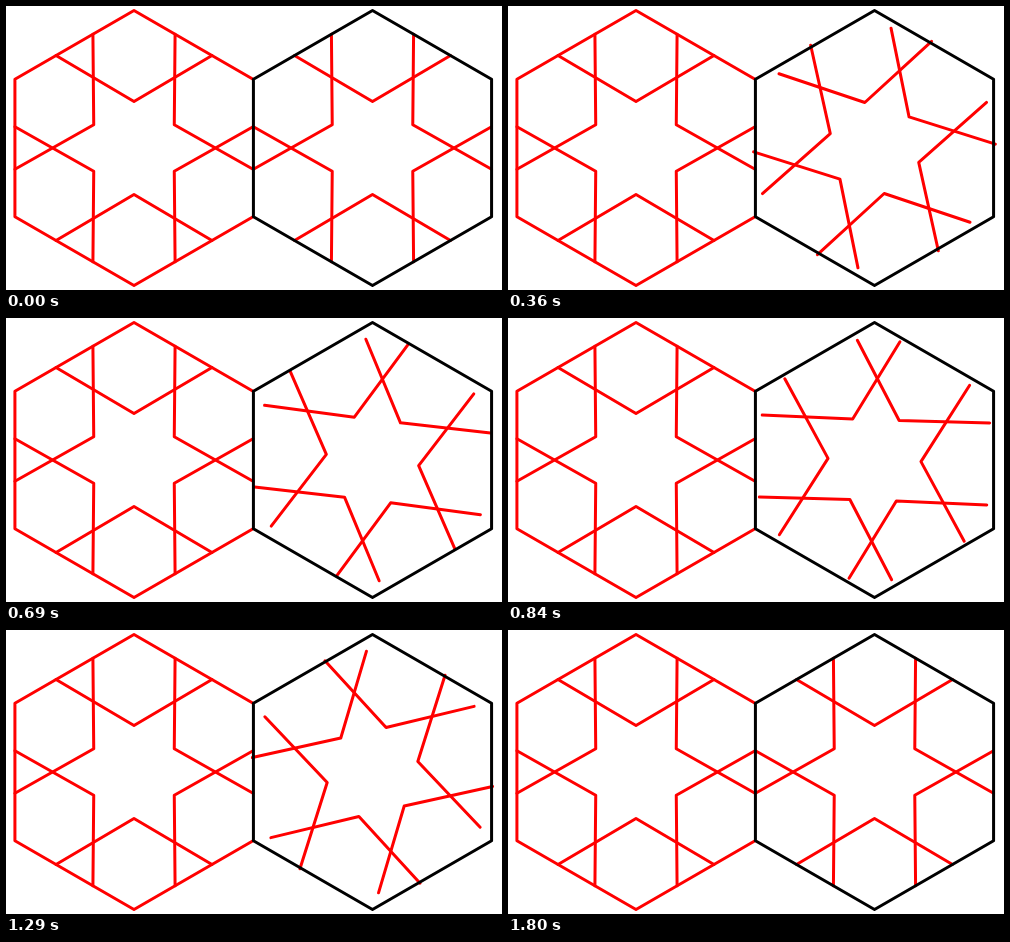
Write an HTML page with a canvas that moves like this. It is 496 by 284 pixels and loops after 1830 ms.

```html
<!DOCTYPE html>
<html lang="en">
<head>
<meta charset="utf-8">
<title>Turning star in a hexagon</title>
<style>
  html, body { margin: 0; width: 496px; height: 284px; overflow: hidden; background: #fff; }
  canvas { display: block; }
</style>
</head>
<body>
<canvas id="stage" width="496" height="284"></canvas>
<script>
const ctx = document.getElementById("stage").getContext("2d");
const RED = "#f00", BLACK = "#000";
const RADIUS = 137.5;      // hexagon centre to corner
const INNER = 46.5;        // centre to the tip of each V
const REACH = 0.655;       // where a V meets the hexagon side
const STEP = 30, STEPS = 61;
const LEFT = 128, RIGHT = 366.5, MIDDLE = 142;
const rad = deg => deg * Math.PI / 180;

const armX = RADIUS * Math.sin(rad(60)) * REACH;
const armY = RADIUS * (1 - REACH / 2);

function hexagon(cx, color, closed) {
  ctx.beginPath();
  for (let i = 0; i < 6; i++) {
    const a = rad(30 - 60 * (i + 1));
    ctx.lineTo(cx + RADIUS * Math.cos(a), MIDDLE + RADIUS * Math.sin(a));
  }
  if (closed) ctx.closePath();
  ctx.strokeStyle = color;
  ctx.stroke();
}

function star(cx, deg) {
  ctx.strokeStyle = RED;
  for (let i = 0; i < 6; i++) {
    ctx.save();
    ctx.translate(cx, MIDDLE);
    ctx.rotate(rad(60 * i - deg));
    ctx.beginPath();
    ctx.moveTo(-armX, -armY);
    ctx.lineTo(0, -INNER);
    ctx.lineTo(armX, -armY);
    ctx.stroke();
    ctx.restore();
  }
}

function draw(ms) {
  // One degree per step, a sixth of a turn per loop
  const deg = Math.floor(ms / STEP + 0.001) % STEPS;
  ctx.fillStyle = "#fff";
  ctx.fillRect(0, 0, 496, 284);
  ctx.lineWidth = 3;
  ctx.lineCap = ctx.lineJoin = "round";
  hexagon(LEFT, RED, false);
  star(LEFT, 0);
  star(RIGHT, deg);
  hexagon(RIGHT, BLACK, true);
}

const start = performance.now();
function tick() {
  draw(Math.max(0, performance.now() - start));
  requestAnimationFrame(tick);
}
tick();
</script>
</body>
</html>
```
